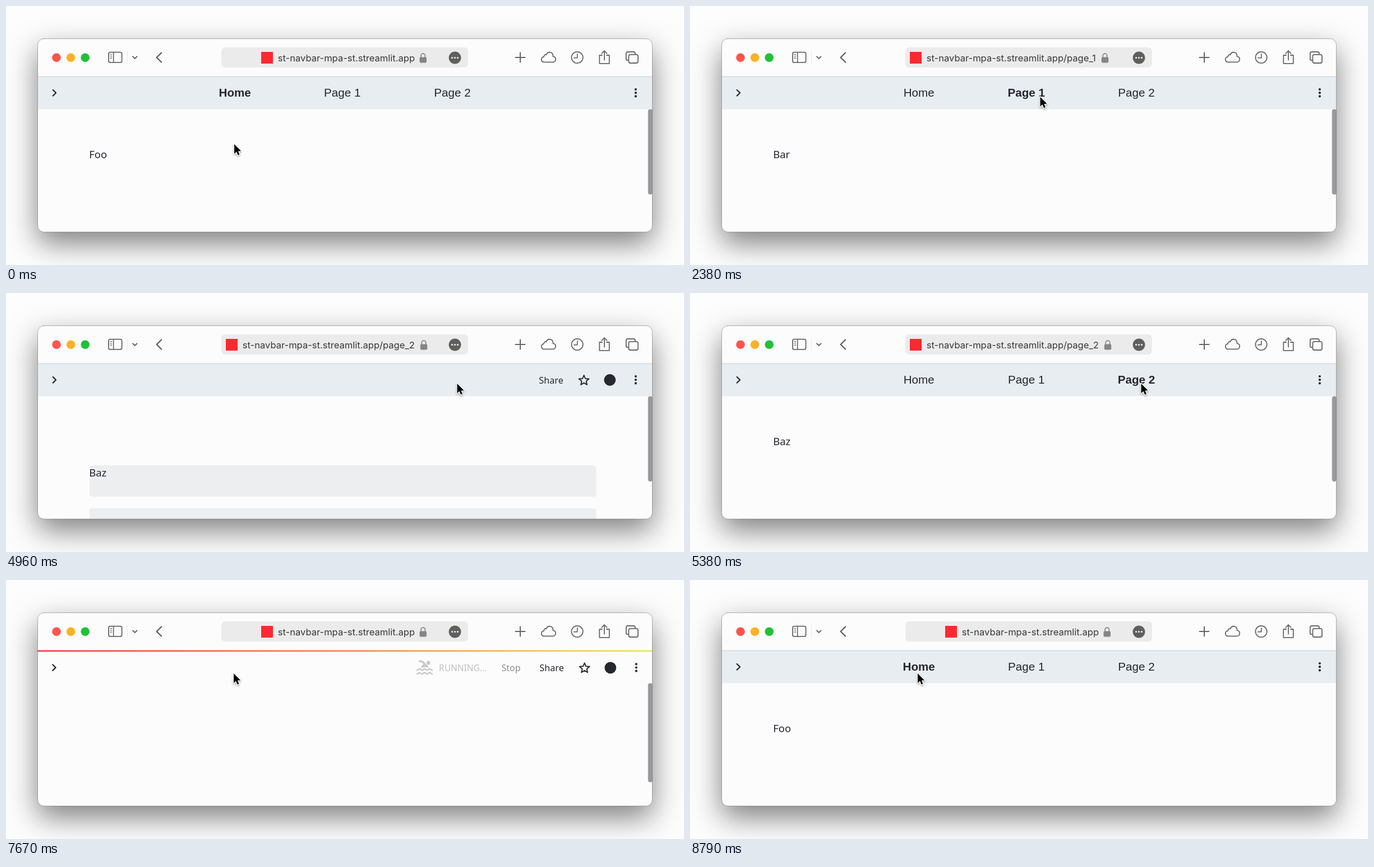
Animation, 1209 px wide and 463 px high, one loop 8.83 s. Source, as an HTML page with a canvas:

```html
<!DOCTYPE html>
<html lang="en">
<head>
<meta charset="utf-8">
<title>Navbar demo</title>
<style>
  html, body { margin: 0; width: 100%; height: 100%; overflow: hidden; background: #fdfdfd; }
  canvas { display: block; width: 1209px; height: 463px; }
</style>
</head>
<body>
<canvas id="stage"></canvas>
<script>
const W = 1209, H = 463, LOOP = 8830;
const INK = '#262730', ICON = '#666664', PAPER = '#fcfcfc';
const SANS = '"Noto Sans", "Open Sans", sans-serif';
const NAV = '"Liberation Sans", Arial, sans-serif';
const UI = 'Inter, Roboto, sans-serif';
const BAR_HOLD = 1000, BAR_FADE = 250;

const canvas = document.getElementById('stage');
const dpr = window.devicePixelRatio || 1;
canvas.width = W * dpr;
canvas.height = H * dpr;
const ctx = canvas.getContext('2d');

const pages = [
  { label: 'Home', x: 408.2, body: 'Foo', path: '', icon: 455, lock: 743.7 },
  { label: 'Page 1', x: 599.7, body: 'Bar', path: '/page_1', icon: 392, lock: 740 },
  { label: 'Page 2', x: 796, body: 'Baz', path: '/page_2', icon: 392, lock: 745 }
];

// Each visit: link pressed, page reloads, placeholders appear, page is ready.
const visits = [
  { page: 1, press: 1500, load: 1660, bones: 2010, ready: 2180 },
  { page: 2, press: 4330, load: 4470, bones: 4880, ready: 5130 },
  { page: 0, press: 7310, load: 7440, bones: 7930, ready: 8190 }
];

const moves = [
  { start: 350, end: 1250, from: [407, 247], to: [624.5, 162.5] },
  { start: 2850, end: 4000, from: [624.5, 162.5], to: [804.5, 162] },
  { start: 6300, end: 7150, from: [804.5, 162], to: [406, 167] }
];

// The scrollbar shows from each reload and fades once the page is idle.
function stateAt(t) {
  const s = { bold: 0, page: 0, phase: 'ready', bar: 1 };
  for (const v of visits) {
    if (t < v.press) break;
    s.bold = v.page;
    if (t < v.load) break;
    s.page = v.page;
    s.phase = t < v.bones ? 'load' : t < v.ready ? 'bones' : 'ready';
    s.bar = Math.max(0, Math.min(1, 1 - (t - v.load - BAR_HOLD) / BAR_FADE));
  }
  return s;
}

function pointerAt(t, state) {
  let x = 407, y = 247, live = false;
  moves.forEach((m, i) => {
    if (t < m.start) return;
    const k = Math.min(1, (t - m.start) / (m.end - m.start));
    const e = k * k * (3 - 2 * k);
    x = m.from[0] + (m.to[0] - m.from[0]) * e;
    y = m.from[1] + (m.to[1] - m.from[1]) * e;
    live = t < visits[i].load;
  });
  const over = pages.some(p => Math.abs(x - p.x) < 42) && y > 138 && y < 176;
  return { x, y, hand: live && over && state.phase === 'ready' };
}

function line(points, color, width, closed) {
  ctx.beginPath();
  points.forEach(([x, y]) => ctx.lineTo(x, y));
  if (closed) ctx.closePath();
  ctx.strokeStyle = color;
  ctx.lineWidth = width;
  ctx.stroke();
}

function box(x, y, w, h, r, fill, stroke, width) {
  ctx.beginPath();
  ctx.roundRect(x, y, w, h, r);
  if (fill) { ctx.fillStyle = fill; ctx.fill(); }
  if (stroke) { ctx.strokeStyle = stroke; ctx.lineWidth = width; ctx.stroke(); }
}

function dot(x, y, r, fill) {
  ctx.beginPath();
  ctx.arc(x, y, r, 0, Math.PI * 2);
  ctx.fillStyle = fill;
  ctx.fill();
}

function text(str, x, y, font, color, align = 'left') {
  ctx.font = font;
  ctx.fillStyle = color;
  ctx.textAlign = align;
  ctx.fillText(str, x, y);
}

function drawWindow() {
  ctx.fillStyle = '#fdfdfd';
  ctx.fillRect(0, 0, W, H);
  ctx.save();
  ctx.shadowColor = 'rgba(0,0,0,.5)';
  ctx.shadowBlur = 52 * dpr;
  ctx.shadowOffsetY = 20 * dpr;
  box(56.5, 58.5, 1096, 345.5, 11, PAPER);
  ctx.restore();
}

function drawCloud() {
  ctx.beginPath();
  ctx.moveTo(960, 100.3);
  ctx.bezierCurveTo(953.5, 100.3, 953, 91.5, 959, 91);
  ctx.bezierCurveTo(959.5, 86.5, 963, 86.5, 963.4, 87.3);
  ctx.bezierCurveTo(966, 80, 976, 82, 975.5, 90.2);
  ctx.bezierCurveTo(982, 91, 981.5, 100.3, 975, 100.3);
  ctx.closePath();
  ctx.strokeStyle = ICON;
  ctx.lineWidth = 1.8;
  ctx.stroke();
}

function drawToolbar(page) {
  ['#ff544d', '#fdb225', '#21c136'].forEach((c, i) => dot(90 + i * 25.6, 92.2, 7.8, c));

  box(183, 82.7, 23.6, 18.2, 3, null, ICON, 1.8);
  line([[191.7, 83], [191.7, 101]], ICON, 1.6);
  for (const y of [86.8, 90, 93.2]) line([[186, y], [188.8, y]], ICON, 1.2);
  line([[216.5, 81], [216.5, 103]], '#e8e8e8', 1);
  line([[226, 90.3], [229.8, 94], [233.6, 90.3]], ICON, 1.9);
  line([[277.2, 83.4], [268.6, 92], [277.2, 100.6]], '#585856', 2.1);

  box(384, 74, 440, 36, 7, '#ebebeb');
  ctx.fillStyle = '#fb2a31';
  ctx.fillRect(page.icon, 82, 21, 21);
  text('st-navbar-mpa-st.streamlit.app' + page.path, page.icon + 29.8, 98.6, `16.55px ${UI}`, '#373737');
  drawLock(page.lock);
  dot(800.5, 92.5, 10.9, '#5f5f5d');
  for (const dx of [-5, 0, 5]) dot(800.5 + dx, 92.5, 1.6, '#f2f2f2');

  line([[908.5, 92], [925.5, 92]], ICON, 2);
  line([[917, 83.5], [917, 100.5]], ICON, 2);
  drawCloud();
  ctx.beginPath();
  ctx.arc(1018.6, 92, 10.2, 0, Math.PI * 2);
  ctx.strokeStyle = ICON;
  ctx.lineWidth = 1.8;
  ctx.stroke();
  line([[1018.8, 85.5], [1018.8, 92.6], [1012.8, 92.6]], ICON, 1.7);
  line([[1063, 88], [1058.3, 88], [1058.3, 102.8], [1075.8, 102.8], [1075.8, 88], [1071, 88]], ICON, 1.8);
  line([[1067, 96.5], [1067, 80.5]], ICON, 1.8);
  line([[1062.3, 84.8], [1067, 80.2], [1071.7, 84.8]], ICON, 1.8);
  box(1105.8, 82, 16.2, 15.2, 3, null, ICON, 1.8);
  box(1110.4, 86.8, 16.6, 15.2, 3, PAPER, ICON, 1.8);
}

function drawLock(x) {
  ctx.beginPath();
  ctx.moveTo(x - 3.7, 93);
  ctx.lineTo(x - 3.7, 88.8);
  ctx.arc(x, 88.8, 3.7, Math.PI, 0);
  ctx.lineTo(x + 3.7, 93);
  ctx.strokeStyle = '#858585';
  ctx.lineWidth = 1.7;
  ctx.stroke();
  box(x - 6.2, 91.6, 12.4, 9.8, 1.8, '#858585');
}

function drawStar(x, y) {
  const points = Array.from({ length: 10 }, (_, i) => {
    const a = -Math.PI / 2 + i * Math.PI / 5, r = i % 2 ? 4.2 : 9.4;
    return [x + Math.cos(a) * r, y + 0.8 + Math.sin(a) * r];
  });
  line(points, INK, 1.9, true);
}

function drawSwimmer() {
  const c = '#c9c9cb';
  dot(753.2, 148, 3.4, c);
  ctx.beginPath();
  ctx.moveTo(737.5, 145.2);
  ctx.quadraticCurveTo(742, 145, 744.5, 147.8);
  ctx.lineTo(751.5, 155);
  ctx.strokeStyle = c;
  ctx.lineWidth = 3.4;
  ctx.stroke();
  ctx.beginPath();
  ctx.moveTo(745, 149.5);
  ctx.lineTo(739.5, 155.5);
  ctx.quadraticCurveTo(742, 157.5, 746.5, 155.8);
  ctx.lineTo(752, 156);
  ctx.fillStyle = c;
  ctx.fill();
  for (const y of [160, 166.8]) {
    ctx.beginPath();
    for (let x = 733; x <= 760; x++) ctx.lineTo(x, y + 1.2 * Math.cos((x - 733) * Math.PI * 2 / 9));
    ctx.lineWidth = 2.6;
    ctx.stroke();
  }
}

function drawHeader(state) {
  const loading = state.phase === 'load';
  const dx = loading ? 1 : 0, dy = loading ? 1.3 : 0;
  if (loading) {
    const g = ctx.createLinearGradient(56, 0, 1153, 0);
    g.addColorStop(0, '#f92f40');
    g.addColorStop(0.5, '#f9813f');
    g.addColorStop(1, '#ebe552');
    ctx.fillStyle = g;
    ctx.fillRect(56, 125.6, 1098, 2.5);
    drawSwimmer();
    text('RUNNING...', 772, 162.8, `15.5px ${SANS}`, '#c0c0c3');
    text('Stop', 883.5, 163, `16px ${SANS}`, '#8e8e93');
  } else {
    ctx.fillStyle = '#e7edf0';
    ctx.fillRect(56, 126, 1098, 58.5);
    ctx.fillStyle = '#bccfdc';
    ctx.fillRect(56, 125.6, 1098, 1);
  }

  const cx = 83.7 - dx / 2;
  line([[cx, 150 + dy], [cx + 5.4, 155.3 + dy], [cx, 160.6 + dy]], INK, 2.2);
  for (const y of [149, 155.2, 161.4]) dot(1122.9 + dx, y + dy, 2.1, INK);

  if (state.phase === 'ready') {
    pages.forEach((p, i) => {
      const weight = i === state.bold ? 'bold ' : '';
      text(p.label, p.x, 161.6, `${weight}20.6px ${NAV}`, INK, 'center');
    });
  } else {
    text('Share', 950.3 + dx, 161.7 + dy, `16.2px ${SANS}`, INK);
    drawStar(1030.6 + dx, 155.6 + dy);
    dot(1076.8 + dx, 155.5 + dy, 10.4, INK);
  }
}

function drawBody(state) {
  const body = pages[state.page].body;
  const font = `18.5px ${SANS}`;
  if (state.phase === 'bones') {
    for (const y of [308, 385]) box(149, y, 903.5, 56, 4.5, '#eceef0');
    text(body, 148.2, 328.4, font, INK);
  } else if (state.phase === 'ready') {
    text(body, 148.2, 272, font, INK);
  }
  ctx.globalAlpha = state.bar;
  box(1144.8, 184.5, 8.2, state.phase === 'load' ? 177 : 152.5, 4, '#99999d');
  ctx.globalAlpha = 1;
}

function drawArrow() {
  const s = 1.05;
  const shape = [[0, 0], [0, 16.4], [3.8, 12.9], [6.3, 18.8], [9, 17.6], [6.6, 11.8], [11.6, 11.6]];
  const points = shape.map(([x, y]) => [x * s, y * s]);
  ctx.shadowColor = 'rgba(0,0,0,.35)';
  ctx.shadowBlur = 3 * dpr;
  ctx.shadowOffsetY = 1.5 * dpr;
  line(points, '#fff', 2.6, true);
  ctx.shadowColor = 'transparent';
  ctx.fillStyle = '#000';
  ctx.fill();
}

function drawHand() {
  ctx.beginPath();
  ctx.moveTo(-1.6, 2);
  ctx.bezierCurveTo(-2.2, -0.8, 1.2, -1.4, 1.9, 1.4);
  ctx.lineTo(3.4, 7);
  ctx.bezierCurveTo(4.2, 5, 6.6, 5.4, 6.9, 7.4);
  ctx.bezierCurveTo(7.8, 5.7, 10, 6.4, 10.1, 8.3);
  ctx.bezierCurveTo(11.4, 7.2, 13, 8, 13, 10.2);
  ctx.bezierCurveTo(13.2, 14, 12.3, 16, 11.3, 18);
  ctx.lineTo(11.2, 20.8);
  ctx.lineTo(2.4, 20.8);
  ctx.bezierCurveTo(0.6, 17.6, -2.6, 14.7, -4.8, 12.2);
  ctx.bezierCurveTo(-6, 10.2, -3.6, 8.8, -1.8, 10.5);
  ctx.lineTo(0.5, 12);
  ctx.closePath();
  ctx.shadowColor = 'rgba(0,0,0,.35)';
  ctx.shadowBlur = 3 * dpr;
  ctx.shadowOffsetY = 1.5 * dpr;
  ctx.fillStyle = '#fff';
  ctx.fill();
  ctx.shadowColor = 'transparent';
  ctx.strokeStyle = '#111';
  ctx.lineWidth = 1.5;
  ctx.stroke();
  for (const x of [4, 6.8, 9.6]) line([[x, 12.5], [x + 0.1, 17.2]], '#111', 1.2);
}

function drawPointer(p) {
  ctx.save();
  ctx.translate(p.x, p.y);
  if (p.hand) drawHand(); else drawArrow();
  ctx.restore();
}

function render(t) {
  const state = stateAt(t);
  ctx.setTransform(dpr, 0, 0, dpr, 0, 0);
  ctx.lineJoin = 'round';
  ctx.lineCap = 'round';
  drawWindow();
  ctx.save();
  ctx.beginPath();
  ctx.roundRect(56.5, 58.5, 1096, 345.5, 11);
  ctx.clip();
  drawToolbar(pages[state.page]);
  drawHeader(state);
  drawBody(state);
  ctx.restore();
  box(56.5, 58.5, 1096, 345.5, 11, null, 'rgba(0,0,0,.32)', 0.9);
  drawPointer(pointerAt(t, state));
}

const began = performance.now();
function tick() {
  render((performance.now() - began) % LOOP);
  requestAnimationFrame(tick);
}
tick();
</script>
</body>
</html>
```
